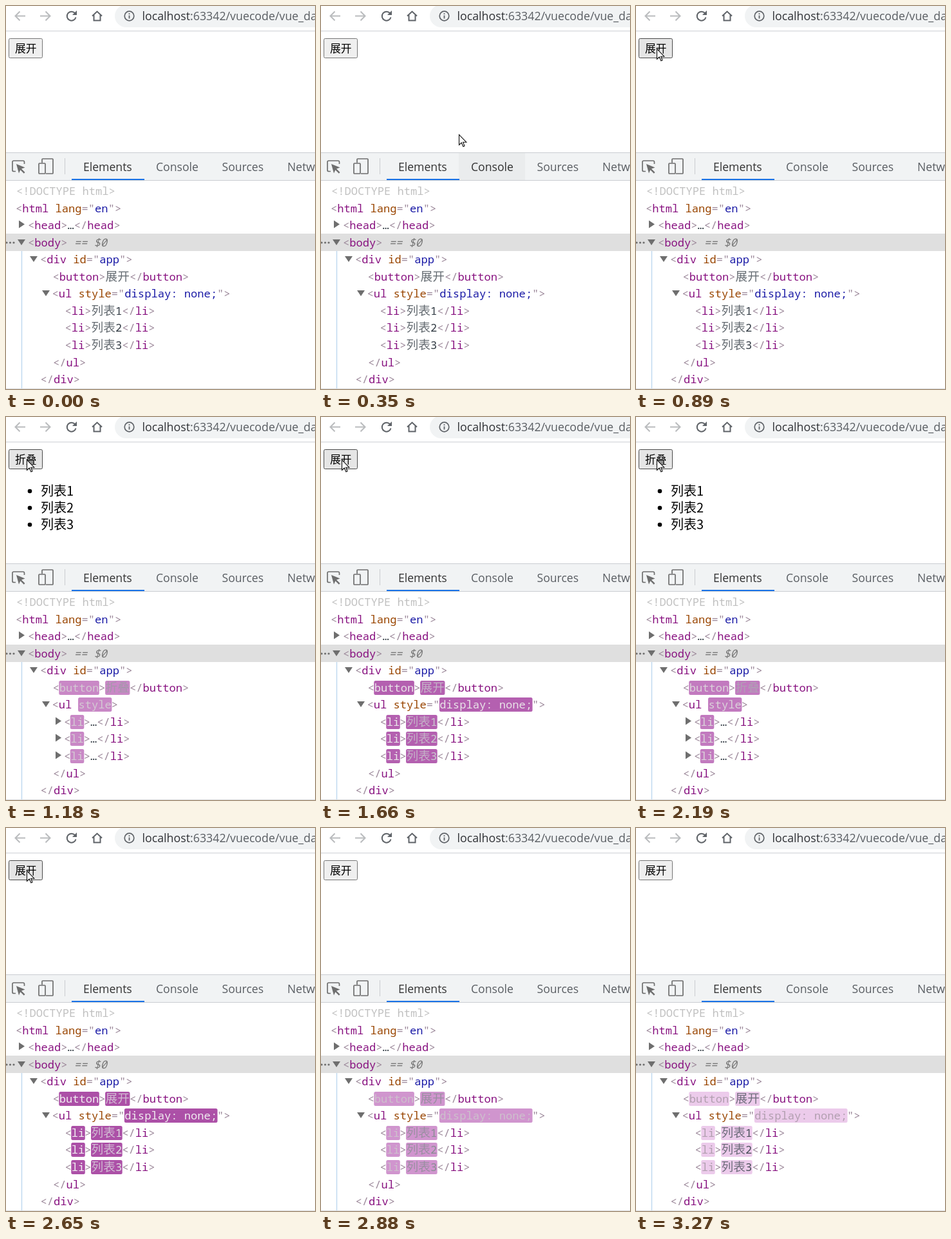
An HTML page that plays this animation: 480x594 px, repeating every 3.34 s.

```html
<!DOCTYPE html>
<html lang="en">
<head>
<meta charset="utf-8">
<style>
html, body { margin: 0; width: 100%; height: 100%; overflow: hidden; background: #fff; }
svg { display: block; width: 480px; height: 594px; }
text { white-space: pre; }
.ui { font-family: "Open Sans", "Noto Sans", sans-serif; font-size: 17.6px; fill: #5a5e63; }
.code { font-family: "Noto Sans Mono", "DejaVu Sans Mono", monospace; font-size: 17.1px; }
.han { font-family: "Noto Sans CJK SC", "Noto Sans CJK", sans-serif; }
.code .han { font-size: 18.67px; font-weight: 300; fill-opacity: .75; }
.line { fill: none; stroke-width: 2; }
</style>
</head>
<body>
<svg id="stage" viewBox="0 0 480 594">
  <rect width="480" height="594" fill="#fff"/>
  <g id="toolbar">
    <g class="line" stroke="#babcbe">
      <path d="M30 15.5H14.5M21.5 8.5L14.5 15.5L21.5 22.5"/>
      <path d="M53 15.5H68.5M61.5 8.5L68.5 15.5L61.5 22.5"/>
    </g>
    <g class="line" stroke="#5f6368">
      <path d="M107 11A7 7 0 1 0 108.5 17.5"/>
      <path d="M134 15.5L141.5 8.5L149 15.5M136.5 14V22.5H146.5V14"/>
    </g>
    <path d="M110 7V14H103Z" fill="#5f6368"/>
    <rect x="169" y="-2" width="340" height="35" rx="17.5" fill="#f1f3f4"/>
    <circle cx="191.5" cy="15.5" r="7.3" class="line" stroke="#5f6368" style="stroke-width:1.7"/>
    <path d="M191.5 14.5V19.5M191.5 11.3V13" stroke="#5f6368" stroke-width="1.8"/>
    <text class="ui" x="211.5" y="22" style="font-size:17.8px"><tspan fill="#303236">localhost</tspan>:63342/vuecode/vue_data</text>
    <rect y="38" width="480" height="1.5" fill="#dcdee1"/>
  </g>
  <g id="page">
    <rect id="button" x="4.5" y="50.5" width="52" height="30" rx="2"/>
    <text id="label" class="han" x="14" y="72" font-size="16.8"></text>
    <g id="list" class="han" font-size="20"></g>
  </g>
  <g id="tabs">
    <rect y="227" width="480" height="44" fill="#f1f3f4"/>
    <path d="M0 227.5H480M0 270.5H480M91.5 236V261" stroke="#cacdd1"/>
    <rect id="tabHover" x="214" y="228" width="103" height="42" fill="#eaeced"/>
    <g class="line" stroke="#6e6e6e" style="stroke-width:1.7">
      <path d="M15 256.5H12Q10 256.5 10 254.5V242Q10 240 12 240H26.5Q28.5 240 28.5 242V245"/>
      <path d="M56 243V238Q56 237 57 237H72Q73 237 73 238V259Q73 260 72 260H62"/>
      <rect x="51" y="244" width="10" height="16" rx="1"/>
    </g>
    <path d="M16 245L29.5 250.5L24 252.5L29.5 258L27.8 259.7L22.3 254.3L20 259.5Z" fill="#6e6e6e"/>
    <text class="ui" x="120" y="256" style="fill:#333">Elements</text>
    <text class="ui" id="console" x="233" y="256">Console</text>
    <text class="ui" x="335.5" y="256">Sources</text>
    <text class="ui" x="437" y="256">Network</text>
    <rect x="102" y="268" width="113" height="2" fill="#1a73e8"/>
  </g>
  <g id="tree" class="code">
    <rect y="353" width="480" height="27" fill="#dfdfdf"/>
    <rect id="rowHover" width="480" height="26.5" fill="#ebf2fb"/>
    <path d="M24.5 380V593" stroke="#b9d5ee" stroke-width="1.3"/>
    <path d="M0 593.5H480" stroke="#dcdee1"/>
    <g fill="#6e6e6e">
      <circle cx="1" cy="367" r="1.6"/><circle cx="6.5" cy="367" r="1.6"/><circle cx="12" cy="367" r="1.6"/>
    </g>
    <g id="fixed"></g>
    <g id="closed"></g>
    <g id="open"></g>
  </g>
  <path id="cursor" d="M.5 .5V16.5L4.2 13L6.9 19L9 18L6.6 12.2H11.8Z" fill="#fff" stroke="#111" stroke-width="1.1"/>
</svg>
<script>
const $ = id => document.getElementById(id);
const LOOP = 3340, ROW = 26.55, CELL = 10.26, HAN = 18.67;
const PUNCT = '#9c889a', TAG = '#881280', ATTR = '#994500', VALUE = '#1a1aa6', TEXT = '#303942';

function add(parent, name, attrs, content = '') {
  const el = document.createElementNS('http://www.w3.org/2000/svg', name);
  for (const key in attrs) el.setAttribute(key, attrs[key]);
  el.textContent = content;
  parent.appendChild(el);
  return el;
}

const isHan = text => /[\u4e00-\u9fff]/.test(text);
const rowCenter = i => Math.round(287 + ROW * i);
const flashes = { open: [], closed: [] };

// Each segment is [text, colour, settled RGB when it flashes on update].
function row(groupId, index, x, segments) {
  const group = $(groupId), y = rowCenter(index);
  for (const [text, fill, settle] of segments) {
    let pen = x;
    const width = [...text].reduce((sum, c) => sum + (isHan(c) ? HAN : CELL), 0);
    const rect = settle && add(group, 'rect', { x: x - .5, y: y - 11, width: width + 1, height: 22, rx: 2.5 });
    const glyphs = text.match(/[\u4e00-\u9fff]+|[^\u4e00-\u9fff]+/g).map(run => {
      const han = isHan(run);
      const el = add(group, 'text', { x: pen, y: y + 6, fill, class: han ? 'han' : '' }, run);
      if (text === '==' || text === '$0') el.setAttribute('font-style', 'italic');
      pen += run.length * (han ? HAN : CELL);
      return el;
    });
    if (settle) flashes[groupId].push({ rect, glyphs, fill, settle });
    x += width;
  }
}

function triangle(groupId, index, x, down) {
  const y = rowCenter(index);
  const d = down ? `M${x} ${y - 5}h12l-6 9z` : `M${x} ${y - 7.5}v12l9 -6z`;
  add($(groupId), 'path', { d, fill: '#6e6e6e' });
}

const p = text => [text, PUNCT];
const tag = text => [text, TAG];
const end = name => [p('</'), tag(name), p('>')];
const GREY = [168, 148, 166], DARK = [48, 57, 66];
const hotTag = name => [p('<'), [name, TAG, GREY], p('>')];

row('fixed', 0, 16, [['<!DOCTYPE html>', '#c0c0c0']]);
row('fixed', 1, 15, [p('<'), tag('html'), p(' '), ['lang', ATTR], p('="'), ['en', VALUE], p('">')]);
row('fixed', 2, 34, [p('<'), tag('head'), p('>'), ['…', TEXT], ...end('head')]);
row('fixed', 3, 34, [p('<'), tag('body'), p('> '), ['==', '#777'], p(' '), ['$0', '#777']]);
row('fixed', 4, 53, [p('<'), tag('div'), p(' '), ['id', ATTR], p('="'), ['app', VALUE], p('">')]);
row('fixed', 10, 73, end('ul'));
row('fixed', 11, 53.5, end('div'));
triangle('fixed', 2, 20, false);
triangle('fixed', 3, 18, true);
triangle('fixed', 4, 37, true);
triangle('fixed', 6, 56, true);

const ul = [p('<'), tag('ul'), p(' ')];
for (const [id, label] of [['closed', '展开'], ['open', '折叠']])
  row(id, 5, 72.5, [...hotTag('button'), [label, TEXT, DARK], ...end('button')]);
row('closed', 6, 71.5, [...ul, ['style', ATTR], p('="'), ['display: none;', VALUE, GREY], p('">')]);
row('open', 6, 71.5, [...ul, ['style', ATTR, GREY], p('>')]);
for (let n = 1; n <= 3; n++) {
  row('closed', 6 + n, 91.5, [...hotTag('li'), ['列表' + n, TEXT, DARK], ...end('li')]);
  row('open', 6 + n, 90, [...hotTag('li'), ['…', TEXT], ...end('li')]);
  triangle('open', 6 + n, 77, false);
  const y = 89 + 26 * n;
  add($('list'), 'circle', { cx: 37, cy: y, r: 3.3 });
  add($('list'), 'text', { x: 54, y: y + 7 }, '列表' + n);
}

// Screen updates come in six runs of seven evenly spaced ticks.
const ticks = [0];
for (const [from, to] of [[120, 570], [650, 1100], [1180, 1660], [1730, 2190], [2270, 2730], [2810, 3270]])
  for (let k = 0; k < 7; k++) ticks.push(Math.floor((from + (to - from) * k / 6) / 10) * 10);

const toggles = [956, 1570, 2020, 2600];
const path = [
  [120, 330, 556], [190, 300, 420], [270, 255, 250], [340, 214, 199], [420, 120, 140],
  [490, 60, 100], [570, 38, 83], [650, 32, 66], [2650, 32, 66], [2730, 250, 300], [2810, 440, 365]
];

function cursorAt(t) {
  if (t < path[0][0] || t > path[path.length - 1][0]) return null;
  const i = Math.max(1, path.findIndex(k => k[0] >= t));
  const [t0, x0, y0] = path[i - 1], [t1, x1, y1] = path[i];
  const u = (t - t0) / (t1 - t0);
  return [x0 + (x1 - x0) * u, y0 + (y1 - y0) * u];
}

// cubic-bezier(0, 0, .2, 1)
function easeOut(x) {
  let lo = 0, hi = 1;
  for (let i = 0; i < 24; i++) {
    const s = (lo + hi) / 2;
    if (.6 * (1 - s) * s * s + s ** 3 < x) lo = s; else hi = s;
  }
  return 3 * (1 - lo) * lo * lo + lo ** 3;
}

const mix = (a, b, u) => `rgb(${a.map((v, i) => Math.round(v + (b[i] - v) * u))})`;
const show = (el, on) => el.setAttribute('display', on ? 'inline' : 'none');

function paintFlash(list, age) {
  const active = age !== null, u = active ? easeOut(Math.min(1, age / 1120)) : 1;
  for (const { rect, glyphs, fill, settle } of list) {
    show(rect, active);
    rect.setAttribute('fill', mix([158, 54, 153], [245, 219, 244], u));
    const color = active ? mix([255, 255, 255], settle, u) : fill;
    glyphs.forEach(g => g.setAttribute('fill', color));
  }
}

function render(time) {
  const t = ticks.filter(k => k <= time).pop();
  const past = toggles.filter(k => k <= t);
  const open = past.length % 2 === 1;
  show($('open'), open);
  show($('closed'), !open);
  show($('list'), open);
  $('label').textContent = open ? '折叠' : '展开';
  paintFlash(flashes[open ? 'open' : 'closed'], past.length ? t - past[past.length - 1] : null);

  const pos = cursorAt(t), [x, y] = pos || [-99, -99];
  show($('cursor'), pos);
  $('cursor').setAttribute('transform', `translate(${Math.round(x)} ${Math.round(y)})`);
  const over = x > 4 && x < 57 && y > 50 && y < 81;
  $('button').setAttribute('fill', over ? '#e5e5e5' : '#efefef');
  $('button').setAttribute('stroke', over ? '#4a4a4a' : '#767676');
  const onTab = t >= 270 && t < 420;
  show($('tabHover'), onTab);
  $('console').style.fill = onTab ? '#333' : '';
  const hovered = Math.floor((y - 273.7) / ROW);
  show($('rowHover'), y > 273 && hovered !== 3);
  $('rowHover').setAttribute('y', rowCenter(hovered) - ROW / 2);
}

const start = performance.now();
function frame() {
  render((performance.now() - start) % LOOP);
  requestAnimationFrame(frame);
}
frame();
</script>
</body>
</html>
```
